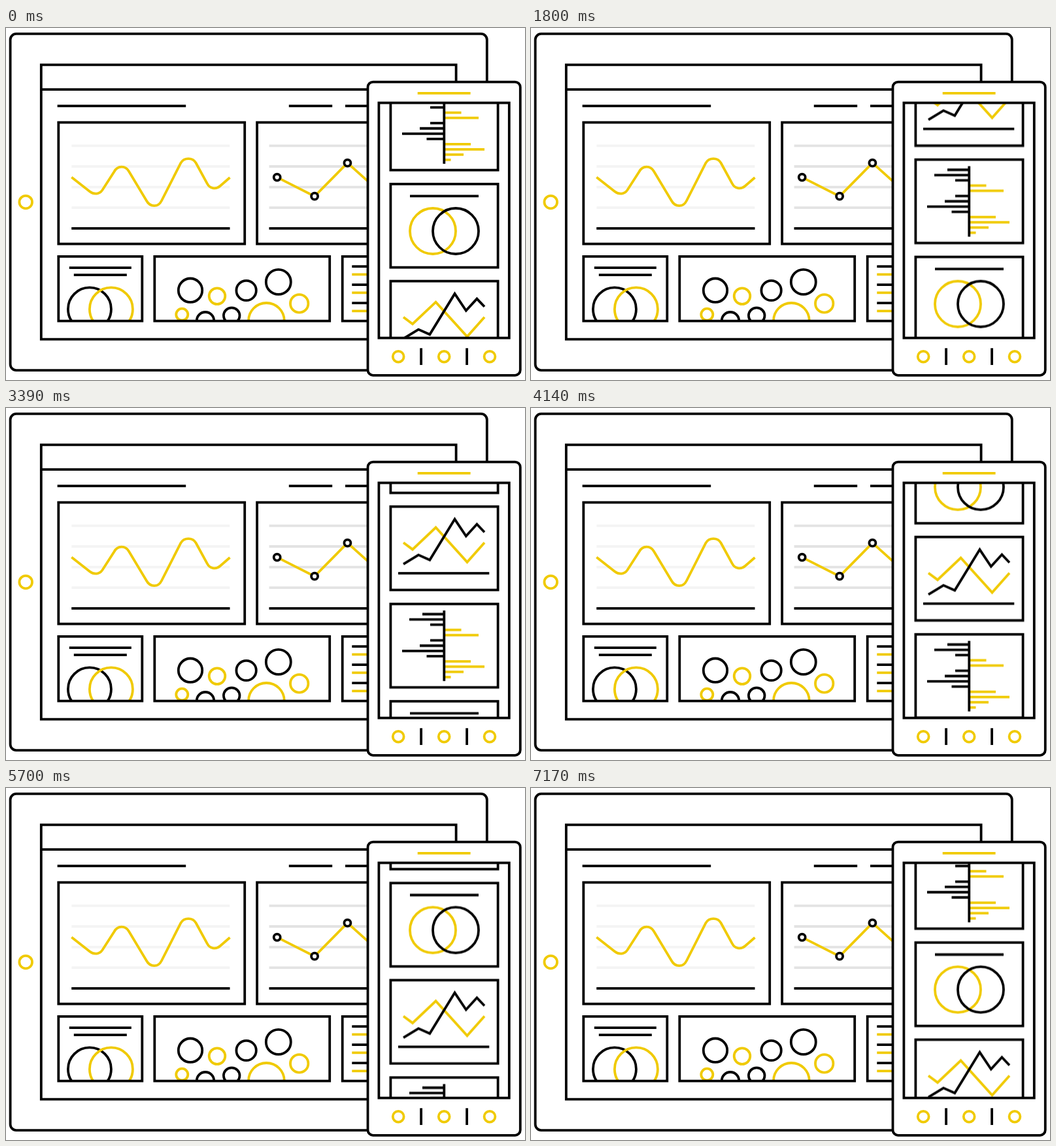
An HTML page for the animation above (7200 ms loop, 794 by 539 pixels).

```html
<!DOCTYPE html>
<html lang="en">
<head>
<meta charset="utf-8">
<title>Dashboards on two devices</title>
<style>
  html, body { margin: 0; width: 100%; height: 100%; overflow: hidden; background: #fff; }
  svg { display: block; width: 794px; height: 539px; fill: none; stroke: #000; stroke-width: 3.8; }
  .y { stroke: #f0ca00; }
  .w { fill: #fff; }
  .scroll { animation: scroll 7200ms steps(240) infinite; }
  @keyframes scroll { to { transform: translateY(446.4px); } }
</style>
</head>
<body>
<svg viewBox="0 0 794 539">
  <defs>
    <clipPath id="tabletClip"><path d="M54 340H560V448H54z"/></clipPath>
    <clipPath id="phoneClip"><path d="M572 116H768V473H572z"/></clipPath>

    <!-- Phone cards, each with its top edge at y = 0 -->
    <g id="bars">
      <rect x="588.4" width="164.2" height="127.7"/>
      <path d="M670.3 15.6H637m33.3 8.04H617m53.3 8.04H649m21.3 24.12H649m21.3 8.04H633m37.3 8.04H606m64.3 8.04H643.5"/>
      <path class="y" d="M670.3 39.7H696.5m-26.2 8.04H723m-52.7 40.2H711m-40.7 8.04H732m-61.7 8.04H700m-29.7 8.04H680.5"/>
      <path d="M670.3 10V118"/>
    </g>
    <g id="venn">
      <rect x="588.4" width="164.2" height="127.7"/>
      <path d="M618 18.4H723"/>
      <circle class="y" cx="653" cy="72.1" r="35"/>
      <circle cx="688" cy="72.1" r="35"/>
    </g>
    <g id="lines">
      <rect x="588.4" width="164.2" height="127.7"/>
      <path class="y" d="M608 55.2L622 65.6L657.5 32L705.5 85L732 55.2"/>
      <path d="M608 88L631 74L648.3 81.7L686.5 19.3L703.8 45.2L720.4 27L732 39.2M600 102.1H739.3"/>
    </g>
    <g id="deck">
      <use href="#bars" y="89.9"/>
      <use href="#venn" y="238.9"/>
      <use href="#lines" y="387.6"/>
    </g>
  </defs>

  <!-- Tablet -->
  <rect x="6.6" y="8.9" width="729.2" height="515.2" rx="9"/>
  <circle class="y" cx="30.2" cy="266.6" r="9.8"/>
  <path d="M53.8 56.3H688.6V476.7H53.8zM53.8 94.2H688.6"/>
  <path d="M78.6 119.4H275.2M432.8 119.4H499.2M519 119.4H570"/>

  <rect x="80.3" y="144.6" width="284.9" height="186"/>
  <path stroke="#f4f4f4" d="M100.4 180.3H342.4M100.4 212H342.4M100.4 243.6H342.4M100.4 275.2H342.4"/>
  <path d="M100.2 306.8H342.5"/>
  <path class="y" d="M100.3 228.6L128 250.2C135 255.6 143 254.6 147.5 248L165.5 220C170.5 210.5 182.5 210 188 219.5L215 264.5C220.5 274.7 233 274.7 238 264.5L267.5 206.5C272.5 198 285.5 198 290.5 206.5L308 238.5C311.5 245.8 321 247.6 327.5 242L342.5 229"/>

  <rect x="384.1" y="144.6" width="285" height="186"/>
  <path stroke="#e3e3e3" d="M402.6 180.3H600M402.6 212H600M402.6 243.6H600M402.6 275.2H600"/>
  <path d="M402.5 306.8H600"/>
  <path class="y" d="M414.7 228.6L472.1 257.7L522.4 206.7L560 240.4"/>
  <g class="w">
    <circle cx="414.7" cy="228.6" r="5"/>
    <circle cx="472.1" cy="257.7" r="5"/>
    <circle cx="522.4" cy="206.7" r="5"/>
  </g>

  <g clip-path="url(#tabletClip)">
    <circle cx="127.9" cy="430.4" r="33"/>
    <circle class="y" cx="160.9" cy="430.4" r="33"/>
    <circle cx="282" cy="401.7" r="18.2"/>
    <circle cx="367.6" cy="402" r="15.2"/>
    <circle cx="416.8" cy="388.9" r="19"/>
    <circle cx="305" cy="448.2" r="13.2"/>
    <circle cx="345.2" cy="440.6" r="12.3"/>
    <g class="y">
      <circle cx="323" cy="410.6" r="12.3"/>
      <circle cx="448.7" cy="421.9" r="13.7"/>
      <circle cx="269.3" cy="438.7" r="9"/>
      <circle cx="398.4" cy="448.4" r="27.4"/>
    </g>
  </g>
  <path d="M80.3 349.9H208.3V448.7H80.3zM227.3 349.9H495.2V448.7H227.3zM514.7 349.9H669V448.7H514.7z"/>
  <path d="M96.8 367.1H191.8M103.8 378.2H184.8"/>
  <path d="M529.3 365.2H600M529.3 393.2H600M529.3 421.2H600"/>
  <path class="y" d="M529.3 377.3H600M529.3 405.3H600M529.3 433.3H600"/>

  <!-- Phone -->
  <rect class="w" x="553.5" y="82.6" width="233.3" height="449.2" rx="8"/>
  <path class="y" d="M629.7 99.8H710.6"/>
  <g clip-path="url(#phoneClip)">
    <g class="scroll">
      <use href="#deck"/>
      <use href="#deck" y="-446.8"/>
    </g>
  </g>
  <rect x="570.4" y="114.6" width="199.4" height="360"/>
  <g class="y">
    <circle cx="600.2" cy="503.2" r="8.4"/>
    <circle cx="670.2" cy="503.2" r="8.4"/>
    <circle cx="740" cy="503.2" r="8.4"/>
  </g>
  <path d="M635.1 490.2V516.1M705.1 490.2V516.1"/>
</svg>
</body>
</html>
```
